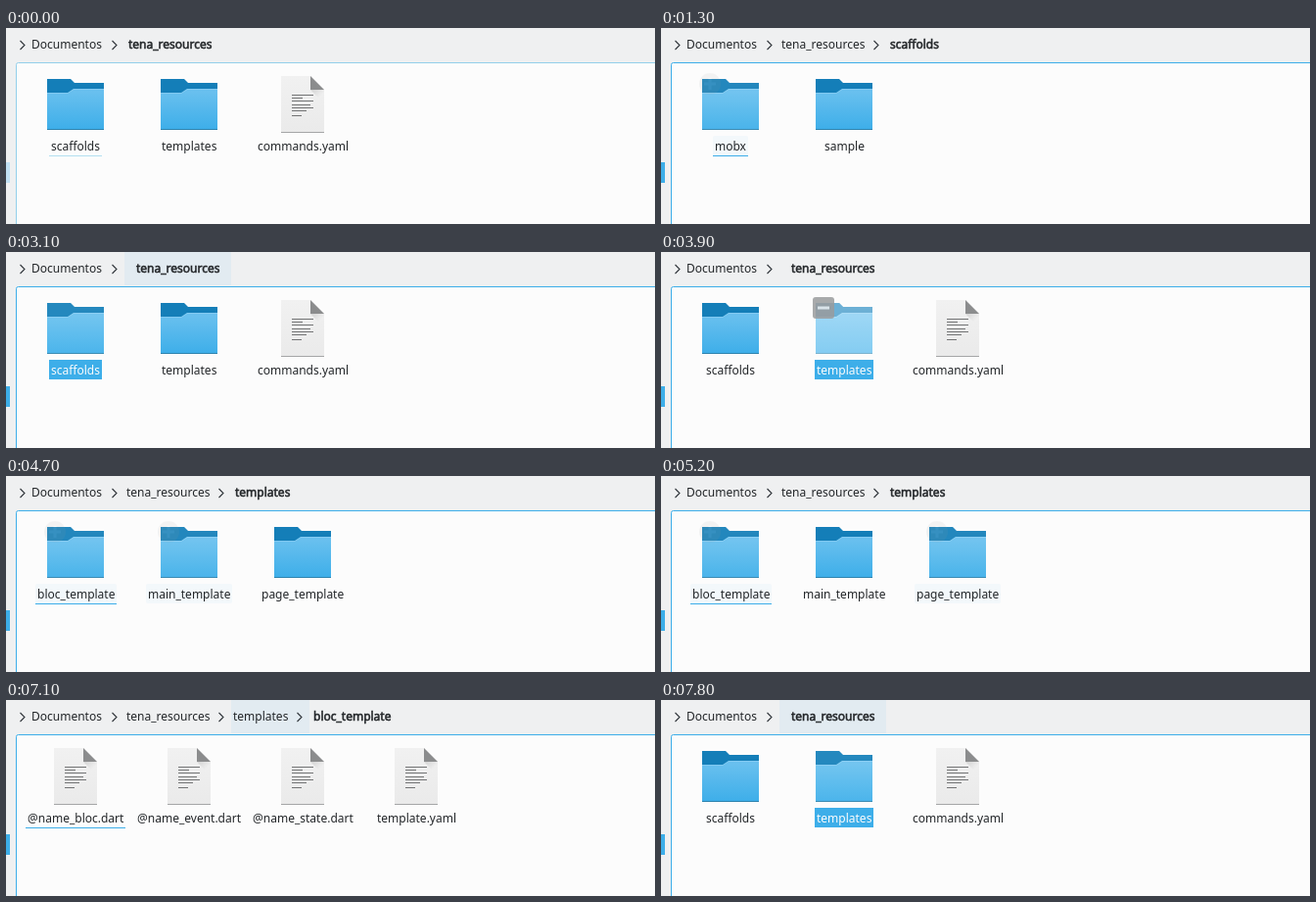
An HTML page that plays this animation: 663x200 px, repeating every 8000 ms.

```html
<!DOCTYPE html>
<html lang="es">
<head>
<meta charset="utf-8">
<title>File browser</title>
<style>
  html, body { margin: 0; width: 100%; height: 100%; overflow: hidden; background: #eff0f1; }
  svg { display: block; }
  text { font: 12px "Noto Sans", "Open Sans", sans-serif; fill: #232629; white-space: pre; }
  .bold { stroke: #232629; stroke-width: .55px; }
  .chevron { fill: none; stroke: #31363b; stroke-width: 1.1; }
</style>
</head>
<body>
<svg width="663" height="200" viewBox="0 0 663 200">
  <defs>
    <linearGradient id="front" x1="0" y1="0" x2="0" y2="1">
      <stop offset="0" stop-color="#6cc1ef"/><stop offset="1" stop-color="#3daee9"/>
    </linearGradient>
    <linearGradient id="page" x1="0" y1="0" x2="0" y2="1">
      <stop offset="0" stop-color="#f1f1f1"/><stop offset="1" stop-color="#eaeaea"/>
    </linearGradient>
    <linearGradient id="shade" x1="0" y1="0" x2="1" y2="1">
      <stop offset="0" stop-color="#000" stop-opacity=".12"/><stop offset=".6" stop-color="#000" stop-opacity="0"/>
    </linearGradient>
    <g id="folder">
      <path d="M3 6H27L31 10H61V30H3Z" fill="#147eb8"/>
      <path d="M3 20H24L30 16H61V58H3Z" fill="url(#front)"/>
      <path d="M3 20.5H24.2L30.2 16.5H61" fill="none" stroke="#fff" stroke-opacity=".16"/>
      <path d="M3 57.5H61" stroke="#2e83ae"/>
    </g>
    <path id="folderShape" d="M3 6H27L31 10H61V58H3Z"/>
    <g id="file">
      <path d="M10 3H40L54 17V61H10Z" fill="url(#page)"/>
      <path d="M40 17H54V31Z" fill="url(#shade)"/>
      <path d="M40 3L54 17H40Z" fill="#8b8c8d"/>
      <path d="M10 60.5H54" stroke="#a5a6a7"/>
      <path d="M21 22.5h22M21 25.5h11M21 28.5h22M21 32.5h19M21 35.5h22M21 38.5h15M21 43.5h10" stroke="#727374"/>
    </g>
    <path id="fileShape" d="M10 3H40L54 17V61H10Z"/>
  </defs>
  <g id="stage"></g>
</svg>
<script>
const LOOP = 8000, STEP = 100, FADE = 300;
const ACCENT = '#3daee9';
const CRUMB_X = [25, 121, 230, 310];

const views = {
  root: { path: ['Documentos', 'tena_resources'], items: ['scaffolds', 'templates', 'commands.yaml'] },
  scaffolds: { path: ['Documentos', 'tena_resources', 'scaffolds'], items: ['mobx', 'sample'] },
  templates: { path: ['Documentos', 'tena_resources', 'templates'],
    items: ['bloc_template', 'main_template', 'page_template'] },
  bloc: { path: ['Documentos', 'tena_resources', 'templates', 'bloc_template'],
    items: ['@name_bloc.dart', '@name_event.dart', '@name_state.dart', 'template.yaml'] }
};

// [start, value]: the last entry already begun applies
const viewTrack = [[0, 'root'], [1300, 'scaffolds'], [3100, 'root'], [4000, 'templates'],
  [5500, 'bloc'], [7400, 'templates'], [7800, 'root']];
const wentUpTrack = [[0, false], [3100, true], [4000, false], [7400, true]];
const selectTrack = [[0, -1], [3100, 0], [3800, 1], [4000, -1], [5400, 0], [5500, -1], [7400, 0], [7800, 1]];
const crumbTrack = [[0, -1], [2000, 0], [2300, -1], [2400, 2], [2600, 1], [3300, -1],
  [6300, 1], [7100, 2], [7600, 1]];

// [view, item, enter, leave]
const hovers = [
  ['root', 0, 300, 1300], ['scaffolds', 0, 1300, 1700], ['root', 1, 3500, 4000],
  ['templates', 1, 4000, 4300], ['templates', 0, 4400, 4600], ['templates', 1, 4700, 4900],
  ['templates', 2, 4900, 5100], ['templates', 0, 5200, 5500], ['bloc', 0, 5700, 5700]
];

const stage = document.getElementById('stage');
const pen = document.createElement('canvas').getContext('2d');
pen.font = '12px "Noto Sans", "Open Sans", sans-serif';

const textWidth = s => pen.measureText(s).width;
const clamp = v => Math.max(0, Math.min(1, v));
const at = (track, t) => track.filter(([start]) => start <= t).pop()[1];
const rect = (x, y, w, h, fill, extra = '') =>
  `<rect x="${x}" y="${y}" width="${w}" height="${h}" fill="${fill}" ${extra}/>`;
const label = (x, y, s, extra = '') => `<text x="${x}" y="${y}" ${extra}>${s}</text>`;
const chevron = x => `<path class="chevron" d="M${x} 13l4.5 4.5l-4.5 4.5"/>`;

function hoverAmount(view, item, t) {
  return hovers.reduce((best, [v, i, enter, leave]) => {
    if (v !== view || i !== item) return best;
    const rise = clamp((t - enter + STEP) / FADE);
    const fall = 1 - clamp((t - leave + STEP) / FADE);
    return Math.max(best, Math.min(rise, fall));
  }, 0);
}

function emblem(selected, amount) {
  const mark = selected ? 'M5 11H17' : 'M5 11H17M11 5V17';
  const shape = selected
    ? rect(0, 0, 22, 22, '#9a9c9d', 'rx="3"')
    : '<circle cx="11" cy="11" r="11" fill="#9a9c9d"/>';
  return `<g opacity="${amount * amount * .85}">${shape}<path d="${mark}" stroke="#eceded" stroke-width="3"/></g>`;
}

function drawItem(name, index, hover, selected, current, active) {
  const center = 71 + 116 * index;
  const w = Math.round(textWidth(name));
  const left = Math.round(center - w / 2);
  const kind = name.includes('.') ? 'file' : 'folder';
  const tint = (selected ? .08 : 0) + hover * (selected ? .34 : .2);
  let out = `<g transform="translate(${center - 32} 46)"><use href="#${kind}"/>`;
  if (tint) out += `<use href="#${kind}Shape" fill="#e4f5fc" opacity="${tint}"/>`;
  if (hover) out += `<g transform="translate(0 0)">${emblem(selected, hover)}</g>`;
  out += '</g>';
  if (selected) out += rect(left - 2, 110, w + 4, 20, ACCENT);
  else if (hover) out += rect(left - 2, 110, w + 4, 20, ACCENT, `rx="2" opacity="${hover * .14}"`);
  if (current) out += rect(left - 2, 130, w + 4, 1, active ? ACCENT : '#b3dff0');
  return out + label(left, 125, name, selected ? 'style="fill:#fcfcfc"' : '');
}

function drawCrumbs(path, hovered, wentUp) {
  const last = path.length - 1;
  let out = chevron(14.5);
  path.forEach((name, i) => {
    const x = CRUMB_X[i], w = textWidth(name);
    const wide = i < last || wentUp;
    const end = wide ? CRUMB_X[i + 1] : x + w + 8;
    if (i === hovered) out += rect(x, 0, end - x, 34, '#e2ebf1');
    if (i < last) {
      out += label(x + (i ? 2 : 1), 21, name) + chevron(CRUMB_X[i + 1] - 12.5);
    } else {
      const tx = wentUp ? Math.round((x + end - w) / 2) : x + 4;
      out += label(tx, 21, name, 'class="bold"');
    }
  });
  return out;
}

function draw(t) {
  const active = t >= 300;
  const key = at(viewTrack, t), view = views[key];
  const selected = at(selectTrack, t);
  const edge = active ? ACCENT : '#93cfea';
  let out = rect(0, 0, 663, 200, '#eff0f1');
  out += drawCrumbs(view.path, at(crumbTrack, t), at(wentUpTrack, t));
  out += rect(10.5, 35.5, 700, 200, '#fcfcfc', `rx="2" stroke="${edge}"`);
  out += rect(0, 137, 4, 21, active ? ACCENT : '#c1e0f3');
  view.items.forEach((name, i) => {
    out += drawItem(name, i, hoverAmount(key, i, t), i === selected, selected < 0 && i === 0, active);
  });
  stage.innerHTML = out;
}

const begin = performance.now();
let shown = -1;
function tick() {
  const t = Math.floor((performance.now() - begin) % LOOP / STEP) * STEP;
  if (t !== shown) draw(shown = t);
  requestAnimationFrame(tick);
}
tick();
</script>
</body>
</html>
```
